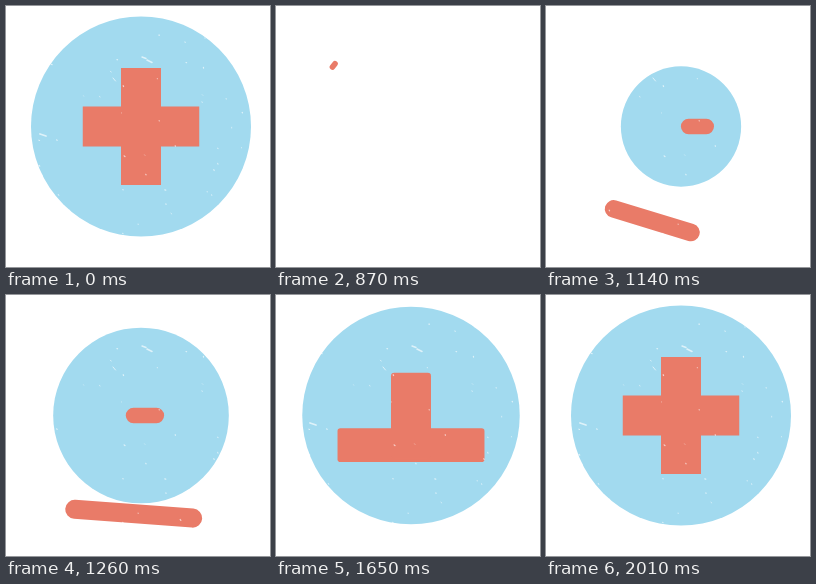
These frames come from a looping animation (264 px wide and 261 px high, 3000 ms). An HTML page with a canvas:

```html
<!DOCTYPE html>
<html lang="en">
<head>
<meta charset="utf-8">
<title>First aid cross</title>
<style>
  html, body { margin: 0; width: 100%; height: 100%; overflow: hidden; background: #fff; }
  canvas { display: block; }
</style>
</head>
<body>
<canvas id="stage" width="264" height="261"></canvas>
<script>
const ctx = document.getElementById('stage').getContext('2d');
const BLUE = '#a2daef', RED = '#e97b68';
const LOOP = 3000, STEP = 30, CLEAR = 540, START = 810, RISE = 1500, DONE = 2010;
const CX = 135, CY = 120.5, RADIUS = 110, ORBIT = 98.5;

const progress = (t, start, end) => Math.min(1, Math.max(0, (t - start) / (end - start)));
const smooth = p => p * p * (3 - 2 * p);
const quartInOut = p => p < 0.5 ? 8 * p ** 4 : 1 - 8 * (1 - p) ** 4;

// What is left of a move, falling from 1 to 0.
const quartLeft = (t, start, end) => (1 - progress(t, start, end)) ** 4;
function decayLeft(t, start, end, tau) {
  const span = (end - start) / tau, rest = Math.exp(-span);
  return (Math.exp(-span * progress(t, start, end)) - rest) / (1 - rest);
}

function random(seed) {
  return () => (seed = seed * 16807 % 2147483647) / 2147483647;
}

function bar(x, y, w, h, round) {
  ctx.fillStyle = RED;
  ctx.beginPath();
  ctx.roundRect(x - w / 2, y - h / 2, w, h, round * Math.min(w, h) / 2);
  ctx.fill();
}

function streak(x, y, dx, dy, width) {
  ctx.lineWidth = width;
  ctx.beginPath();
  ctx.moveTo(x, y);
  ctx.lineTo(x + dx, y + dy);
  ctx.stroke();
}

// White wear marks, fixed to the stage and visible only on the shapes.
function drawGrain() {
  const rnd = random(4711);
  ctx.strokeStyle = 'rgba(255, 255, 255, .65)';
  ctx.lineCap = 'round';
  for (let i = 0; i < 48; i++) {
    streak(25 + 220 * rnd(), 11 + 220 * rnd(), rnd(), rnd(), 0.7 + 0.6 * rnd());
  }
  streak(136, 51, 4, 1.5, 1.4);
  streak(141, 54, 5, 2.5, 1.6);
  streak(34, 128, 6, 2, 1.8);
  streak(107, 72, 2.5, 3, 1);
}

function drawDisc(t) {
  ctx.fillStyle = BLUE;
  ctx.beginPath();
  ctx.arc(CX, CY, RADIUS * (1 - decayLeft(t, 1022, 1860, 150)), 0, Math.PI * 2);
  ctx.fill();
}

// Swings round the centre as it grows, then rises and squares up.
function drawLongBar(t, round) {
  const swing = quartLeft(t, START, 1550);
  const rise = decayLeft(t, RISE, DONE, 130);
  const length = 5 + 146 * smooth(progress(t, START, 1365))
    - 34.5 * progress(t, RISE, DONE) ** 1.75;
  const thickness = Math.max(3, 40 - 20.5 * rise - 19.5 * swing);
  ctx.save();
  ctx.translate(CX, CY);
  ctx.rotate(swing * Math.PI);
  bar(0, ORBIT * rise, length, thickness, round);
  ctx.restore();
}

// Slides in from the right, then grows upright.
function drawPost(t, round) {
  const slide = quartLeft(t, 920, 1540);
  const width = 40 * (1 - slide);
  const height = Math.min(width, 15.5) + 101.5 * quartInOut(progress(t, 1350, 1890));
  bar(CX + 95 * slide, CY, width, height, round);
}

function draw(t) {
  ctx.clearRect(0, 0, 264, 261);
  if (t >= CLEAR && t < START) return;
  if (t < CLEAR) t = DONE;
  const round = 1 - progress(t, RISE, 1680);
  drawDisc(t);
  drawLongBar(t, round);
  drawPost(t, round);
  drawGrain();
}

function tick(now) {
  draw(Math.floor(now % LOOP / STEP) * STEP);
  requestAnimationFrame(tick);
}
tick(performance.now());
</script>
</body>
</html>
```
